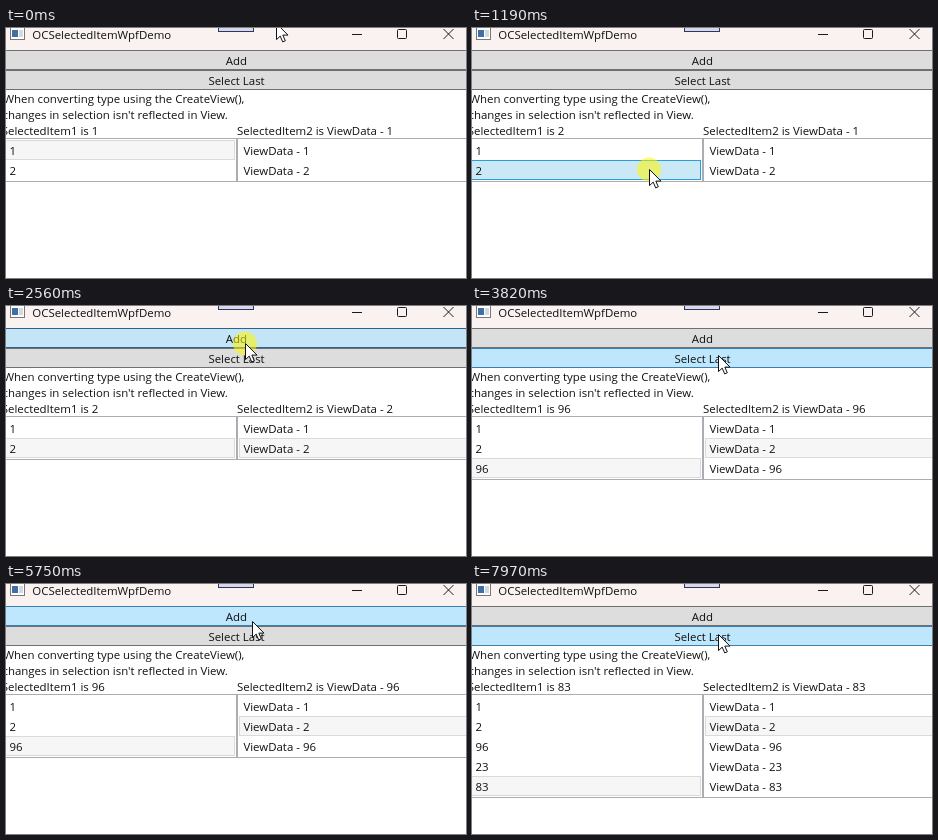
These frames come from a looping animation (460 px wide and 250 px high, 8 s). An HTML page:

```html
<!DOCTYPE html>
<html lang="en">
<head>
<meta charset="utf-8">
<title>Selected item demo</title>
<style>
  html, body { margin: 0; width: 100%; height: 100%; overflow: hidden; background: #fff; }
  svg { display: block; width: 460px; height: 250px; }
  text { font: 11.45px "Open Sans", "Noto Sans", sans-serif; fill: #111; white-space: pre; }
</style>
</head>
<body>
<svg id="stage" viewBox="0 0 460 250" xmlns="http://www.w3.org/2000/svg"></svg>
<script>
const LOOP = 8000;
const HOLD = 130;  // how long the mouse button stays down
const TICK = 70;   // interval between pointer updates
const ROW = 20;
const BUTTONS_TOP = 22, ROWS_TOP = 112;
const stage = document.getElementById('stage');

function add(tag, attrs, text) {
  const el = document.createElementNS(stage.namespaceURI, tag);
  set(el, attrs);
  if (text !== undefined) el.textContent = text;
  stage.append(el);
  return el;
}
function set(el, attrs) {
  for (const key in attrs) el.setAttribute(key, attrs[key]);
}
const show = (el, on) => set(el, { visibility: on ? 'visible' : 'hidden' });
const paint = (el, [fill, stroke]) => set(el, { fill, stroke });
const box = (x, y, width, height, fill, stroke) =>
  add('rect', { x, y, width, height, fill, stroke });
const label = (x, y, text, attrs = {}) => add('text', { x, y, ...attrs }, text);
const line = d => add('path', { d, stroke: '#1a1a1a', fill: 'none' });

// Fill and border of each control state
const look = {
  normal: ['#dddddd', '#707070'],
  hover: ['#bee6fd', '#3c7fb1'],
  pressed: ['#c4e5f6', '#2c628b'],
  rowHover: ['#e4f4fb', '#70c0e7'],
  active: ['#cbe8f6', '#26a0da'],
  inactive: ['#f6f6f6', '#dadada']
};

// Title bar
box(0, 0, 460, 22, '#f9f2f1');
box(212.5, -3.5, 35, 7, '#d6d9ee', '#34345c');
box(4.5, -1.5, 14, 13, '#fff', '#777');
box(6, 2, 6, 7, '#3f6fa5');
box(13, 2, 4, 7, '#d4d9de');
label(26.3, 11, 'OCSelectedItemWpfDemo');
line('M346 6.5H356');
add('rect', { x: 391.5, y: 1.5, width: 9, height: 9, rx: 1, fill: 'none', stroke: '#1a1a1a' });
line('M437.5 1L447.5 11M447.5 1L437.5 11');

const buttons = ['Add', 'Select Last'].map((name, i) => {
  const top = BUTTONS_TOP + ROW * i;
  const face = box(-3.5, top + .5, 468, ROW - 1);
  label(230.5, top + 15, name, { 'text-anchor': 'middle' });
  return { top, face };
});

label(-2.5, 75, 'When converting type using the CreateView(),');
label(-3.5, 91, "changes in selection isn't reflected in View.");

const values = [1, 2, 96, 23, 83];
const lists = [
  { x: -3, titleX: -4.3, prefix: '', head: 'SelectedItem1 is ' },
  { x: 231, titleX: 231, prefix: 'ViewData - ', head: 'SelectedItem2 is ' }
];
for (const list of lists) {
  const { x, prefix } = list;
  list.title = label(list.titleX, 107, '');
  list.frame = box(x + .5, ROWS_TOP - 1.5, 233, 0, '#fff', '#abadb3');
  list.rows = values.map((value, i) => {
    const top = ROWS_TOP + ROW * i;
    return {
      top,
      back: box(x + 2.5, top + .5, 229, ROW - 1),
      text: label(x + 6.4, top + 15, prefix + value)
    };
  });
}

const halo = add('circle', { r: 12, fill: '#fff500', opacity: .55 });
const arrow = add('path', {
  d: 'M.5 .5V16.6L4.2 13.1L6.7 18.9L9.3 17.8L6.8 12.1H12Z',
  fill: '#fff', stroke: '#111', 'stroke-linejoin': 'round'
});

// What each click does to the state
const pickItem = s => { s.picked[0] = s.named[0] = 1; s.focus = 0; };
const pickView = s => { s.picked[1] = s.named[1] = 1; s.focus = 1; };
const addItem = s => { s.count++; };
const selectLast = s => { s.picked[0] = s.named[0] = s.named[1] = s.count - 1; };

// Each visit: travel from leave to arrive, then click at the listed times
const visits = [
  { x: 177, y: 141, leave: 500, arrive: 1040, clicks: [1120], act: pickItem, onPress: true },
  { x: 252, y: 140, leave: 1410, arrive: 1600, clicks: [1810], act: pickView, onPress: true },
  { x: 239, y: 37, leave: 2010, arrive: 2160, clicks: [2560], act: addItem },
  { x: 246, y: 49, leave: 2760, arrive: 2960, clicks: [3690], act: selectLast },
  { x: 246, y: 33, leave: 5680, arrive: 5890, clicks: [6090, 6890], act: addItem },
  { x: 246, y: 50, leave: 7290, arrive: 7630, clicks: [7830], act: selectLast }
];

const easeOut = u => 1 - (1 - u) ** 2;

function pointer(t) {
  let x = 270, y = -5;
  for (const v of visits) {
    if (t < v.leave) break;
    const moved = (Math.floor((t - v.leave) / TICK) + 1) * TICK;
    const u = easeOut(Math.min(1, moved / (v.arrive - v.leave + TICK)));
    x += (v.x - x) * u;
    y += (v.y - y) * u;
  }
  return { x: Math.round(x), y: Math.round(y) };
}

// Replay every click up to time t
function stateAt(t) {
  const s = { count: 2, focus: -1, picked: [0, -1], named: [0, 0], down: false };
  for (const { clicks, act, onPress } of visits) {
    for (const press of clicks) {
      if (t < press) continue;
      s.focus = -1;
      s.down = t < press + HOLD;
      if (onPress || !s.down) act(s);
    }
  }
  return s;
}

function draw(t) {
  const p = pointer(t), s = stateAt(t);
  const within = top => p.y >= top && p.y < top + ROW;

  for (const { top, face } of buttons) {
    paint(face, !within(top) ? look.normal : s.down ? look.pressed : look.hover);
  }

  lists.forEach((list, k) => {
    list.title.textContent = list.head + list.prefix + values[s.named[k]];
    set(list.frame, { height: 3 + ROW * s.count });
    const inside = p.x >= list.x + 2 && p.x < list.x + 232;
    list.rows.forEach(({ top, back, text }, i) => {
      const exists = i < s.count;
      const picked = i === s.picked[k];
      show(text, exists);
      show(back, exists && (picked || inside && within(top)));
      paint(back, !picked ? look.rowHover : s.focus === k ? look.active : look.inactive);
    });
  });

  show(halo, s.down);
  set(halo, { cx: p.x, cy: p.y + .5 });
  set(arrow, { transform: `translate(${p.x} ${p.y})` });
}

function tick() {
  draw(performance.now() % LOOP);
  requestAnimationFrame(tick);
}
tick();
</script>
</body>
</html>
```
